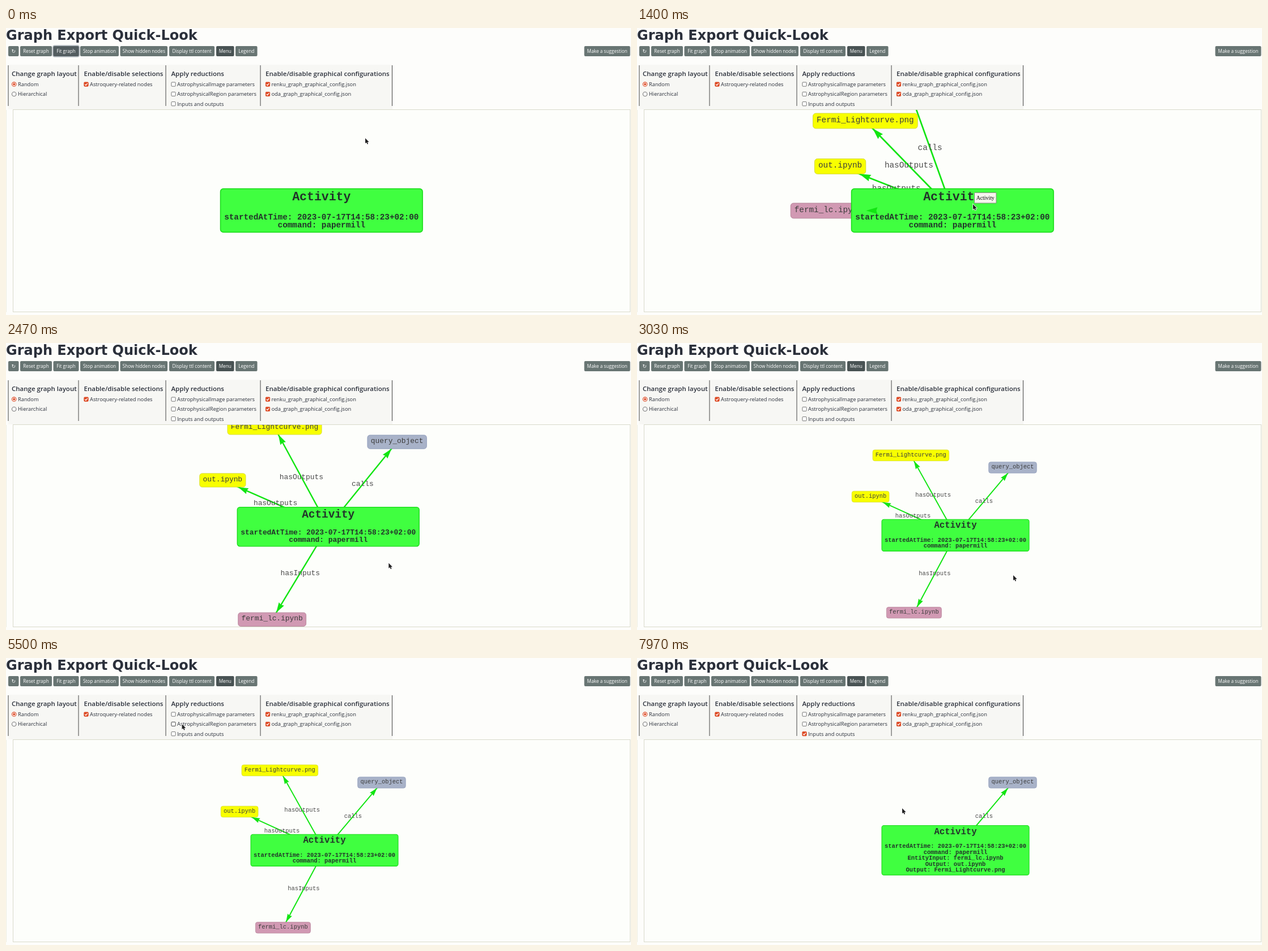
An HTML page with a canvas for the animation above (8 s loop, 1103 by 508 pixels).

```html
<!DOCTYPE html>
<html lang="en">
<head>
<meta charset="utf-8">
<title>Graph Export Quick-Look</title>
<style>
html, body { margin: 0; width: 100%; height: 100%; overflow: hidden; background: #fdfdfb; }
canvas { display: block; width: 1103px; height: 508px; }
</style>
</head>
<body>
<canvas id="stage"></canvas>
<script>
const W = 1103, H = 508, LOOP = 8000;
const canvas = document.getElementById('stage');
const ctx = canvas.getContext('2d');
const dpr = window.devicePixelRatio || 1;
canvas.width = W * dpr;
canvas.height = H * dpr;

const UI = '"Open Sans", "Noto Sans", sans-serif';
const MONO = '"Liberation Mono", monospace';
const INK = '#2b303b', GREEN = '#12e512', ORANGE = '#dd4a25';
const FONT = 14.3, LINE = 14.4, CHAR = FONT * 0.6;
const CHECKED_AT = 6000, REDUCED_AT = 6190;

// Cursor: time, x, y
const cursorKeys = [
  [30, 634, 195], [400, 597, 305], [570, 597, 305], [700, 593, 312],
  [1480, 593, 312], [2000, 677, 346], [2300, 677, 346], [2530, 675, 398],
  [3030, 664, 411], [3370, 535, 359], [3500, 535, 359], [3770, 297, 132],
  [4270, 297, 132], [4600, 297, 86], [4750, 297, 86], [5100, 302, 102],
  [5900, 319, 132], [7000, 319, 132], [7940, 468, 266]
];

// Wheel zoom steps: start, scale, centre of the main node
const views = [
  [0, 1, 556.8, 323], [2040, 0.9, 568.7, 325.2],
  [2600, 0.81, 565.1, 333.2], [2720, 0.729, 562, 340.3]
];

// Satellites swing around the main node: time, angle, radius
const satellites = [
  { label: 'fermi_lc.ipynb', edge: 'hasInputs', fill: '#d199b3', line: '#b58398',
    keys: [[930, 196, 90], [1400, 180, 219], [1700, 146, 218], [2070, 126.9, 213], [2680, 118.1, 213]] },
  { label: 'out.ipynb', edge: 'hasOutputs', fill: '#f8ff00', line: '#d5da30',
    keys: [[930, 205, 100], [1400, 201.5, 213], [1700, 201.5, 224], [2070, 202.5, 227], [2680, 204.5, 226]] },
  { label: 'Fermi_Lightcurve.png', edge: 'hasOutputs', fill: '#f8ff00', line: '#d5da30',
    keys: [[930, 216, 95], [1400, 225.8, 221], [1700, 237, 221], [2070, 243, 220], [2680, 240.9, 222]] },
  { label: 'query_object', edge: 'calls', fill: '#a8b2c8', line: '#8c99b9', stays: true,
    keys: [[930, 230, 100], [1400, 250.2, 236], [1700, 286, 222], [2070, 306.8, 213.6], [2680, 310.1, 215]] }
];

const buttons = [
  ['↻', 4, 22.5], ['Reset graph', 25, 81], ['Fit graph', 83.5, 128.5], ['Stop animation', 131, 199],
  ['Show hidden nodes', 201.5, 285], ['Display ttl content', 288, 368], ['Menu', 371, 402.5],
  ['Legend', 405, 443.5], ['Make a suggestion', 1020.5, 1101.5]
];

const smooth = u => u * u * (3 - 2 * u);

function track(keys, t, ease = u => u) {
  if (t <= keys[0][0]) return keys[0].slice(1);
  const i = keys.findIndex(k => k[0] > t);
  if (i < 0) return keys[keys.length - 1].slice(1);
  const a = keys[i - 1], b = keys[i];
  const u = ease((t - a[0]) / (b[0] - a[0]));
  return a.slice(1).map((v, j) => v + (b[j + 1] - v) * u);
}

function text(str, x, y, font, color = INK, align = 'left') {
  ctx.font = font;
  ctx.fillStyle = color;
  ctx.textAlign = align;
  ctx.fillText(str, x, y);
}

function box(x, y, w, h, r, fill, stroke, width = 1) {
  ctx.beginPath();
  ctx.roundRect(x, y, w, h, r);
  if (fill) { ctx.fillStyle = fill; ctx.fill(); }
  if (stroke) { ctx.strokeStyle = stroke; ctx.lineWidth = width; ctx.stroke(); }
}

function path(points, close) {
  ctx.beginPath();
  points.forEach(([x, y]) => ctx.lineTo(x, y));
  if (close) ctx.closePath();
}

function line(x1, y1, x2, y2, color, width = 1) {
  path([[x1, y1], [x2, y2]]);
  ctx.strokeStyle = color;
  ctx.lineWidth = width;
  ctx.stroke();
}

function drawButtons(t) {
  for (const [label, x1, x2] of buttons) {
    const focused = label === 'Fit graph' && t < 600;
    const fill = label === 'Menu' ? '#495354' : focused ? '#535d60' : '#687573';
    if (focused) box(x1 - 0.5, 31.5, x2 - x1 + 1, 19, 3, null, '#b4bbc0', 2.5);
    box(x1, 32, x2 - x1, 18, 2, fill);
    const font = label === '↻' ? '9px "DejaVu Sans", sans-serif' : '8.2px ' + UI;
    text(label, (x1 + x2) / 2, 44, font, '#fff', 'center');
  }
}

function radio(x, y, label, on) {
  ctx.beginPath();
  ctx.arc(x, y, 3.7, 0, 7);
  ctx.fillStyle = '#fff';
  ctx.fill();
  ctx.strokeStyle = on ? ORANGE : '#777';
  ctx.lineWidth = 1.1;
  ctx.stroke();
  if (on) {
    ctx.beginPath();
    ctx.arc(x, y, 2, 0, 7);
    ctx.fillStyle = ORANGE;
    ctx.fill();
  }
  text(label, x + 6.8, y + 3.3, '9.3px ' + UI);
}

function checkbox(x, y, label, on, hover) {
  const edge = on ? (hover ? '#b43412' : ORANGE) : (hover ? '#444' : '#777');
  box(x - 3.6, y - 3.6, 7.2, 7.2, 1, on ? edge : '#fff', edge);
  if (on) {
    path([[x - 2.2, y], [x - 0.6, y + 1.8], [x + 2.4, y - 1.8]]);
    ctx.strokeStyle = '#fff';
    ctx.lineWidth = 1.3;
    ctx.stroke();
  }
  text(label, x + 6.5, y + 3.3, '9.3px ' + UI);
}

function drawMenu(t, [cx, cy]) {
  ctx.fillStyle = '#f7f7f4';
  ctx.fillRect(4, 65, 678, 79);
  for (const x of [4, 128, 282, 449, 681.5]) line(x, 66, x, 138, '#444');
  const heads = [['Change graph layout', 10], ['Enable/disable selections', 137.5],
    ['Apply reductions', 291.5], ['Enable/disable graphical configurations', 458]];
  for (const [label, x] of heads) text(label, x, 84.7, '600 11.5px ' + UI);
  radio(14.2, 99.6, 'Random', true);
  radio(14.2, 117, 'Hierarchical', false);
  checkbox(141.5, 99.6, 'Astroquery-related nodes', true);
  const rows = ['AstrophysicalImage parameters', 'AstrophysicalRegion parameters', 'Inputs and outputs'];
  rows.forEach((label, i) => {
    const y = 99.6 + i * 17.3;
    const hover = cx > 290 && cx < 384 && Math.abs(cy - y) < 6;
    checkbox(295.5, y, label, i === 2 && t >= CHECKED_AT, hover);
  });
  checkbox(462, 99.6, 'renku_graph_graphical_config.json', true);
  checkbox(462, 117, 'oda_graph_graphical_config.json', true);
}

function satelliteAt(node, t) {
  const [angle, r] = track(node.keys, t);
  const a = angle * Math.PI / 180;
  return { node, x: r * Math.cos(a), y: r * Math.sin(a), hw: node.label.length * CHAR / 2 + 6.5, hh: 13.4 };
}

function drawEdge({ node, x, y }) {
  line(0, 0, x, y, GREEN, 2.7);
  text(node.edge, x / 2, y / 2 + 3.6, FONT + 'px ' + MONO, '#4a4a4a', 'center');
}

function drawArrow({ x, y, hw, hh }) {
  const k = Math.min(hw / Math.abs(x), hh / Math.abs(y));
  ctx.save();
  ctx.translate(x - x * k, y - y * k);
  ctx.rotate(Math.atan2(y, x));
  path([[0, 0], [-20, 6], [-18, 0], [-20, -6]], true);
  ctx.fillStyle = GREEN;
  ctx.fill();
  ctx.restore();
}

function drawSatellite({ node, x, y, hw, hh }) {
  box(x - hw, y - hh, hw * 2, hh * 2, 5, node.fill, node.line);
  text(node.label, x, y + 2.4, FONT + 'px ' + MONO, '#3d3d3d', 'center');
}

function drawActivity(reduced) {
  const lines = ['startedAtTime: 2023-07-17T14:58:23+02:00', 'command: papermill'];
  if (reduced) lines.push('EntityInput: fermi_lc.ipynb', 'Output: out.ipynb', 'Output: Fermi_Lightcurve.png');
  const hw = 178.3, hh = (48.2 + lines.length * LINE) / 2;
  box(-hw, -hh, hw * 2, hh * 2, 5, '#40ff40', '#16d916', 1.5);
  text('Activity', 0, -hh + 20.8, 'bold 21.5px ' + MONO, '#22332a', 'center');
  lines.forEach((str, i) => {
    const y = hh - 8.3 - (lines.length - 1 - i) * LINE;
    text(str, 0, y, 'bold ' + FONT + 'px ' + MONO, '#22332a', 'center');
  });
}

function drawGraph(t) {
  ctx.fillStyle = '#fdfefb';
  ctx.fillRect(12, 144, 1090, 359);
  ctx.save();
  ctx.beginPath();
  ctx.rect(13, 145, 1088, 357);
  ctx.clip();
  const [, scale, x, y] = views.filter(v => v[0] <= t).pop();
  ctx.translate(x, y);
  ctx.scale(scale, scale);
  const reduced = t >= REDUCED_AT;
  const shown = t < 930 ? [] : satellites.filter(n => n.stays || !reduced).map(n => satelliteAt(n, t));
  shown.forEach(drawEdge);
  shown.forEach(drawSatellite);
  drawActivity(reduced);
  shown.forEach(drawArrow);
  ctx.restore();
  ctx.strokeStyle = '#d9dacb';
  ctx.lineWidth = 1;
  ctx.strokeRect(12.5, 144.5, 1089, 358);
}

function drawTooltip(x, y) {
  box(x + 2.5, y - 20.5, 38.5, 18.5, 1, '#f6f5ee', '#85857e');
  text('Activity', x + 21.7, y - 8, '9.8px "Liberation Serif", serif', '#000', 'center');
}

function drawCursor(x, y) {
  ctx.save();
  ctx.translate(x, y);
  if (y > 74 && y < 89) {
    for (const [color, w] of [['#fff', 2.4], ['#222', 1]]) {
      line(0, -4.5, 0, 4.5, color, w);
      line(-2.2, -4.8, 2.2, -4.8, color, w);
      line(-2.2, 4.8, 2.2, 4.8, color, w);
    }
  } else {
    path([[0, 0], [0, 9.3], [2.1, 7.5], [3.6, 10.8], [5.2, 10], [3.8, 6.9], [6.6, 6.7]], true);
    ctx.strokeStyle = '#fff';
    ctx.lineWidth = 1.4;
    ctx.stroke();
    ctx.fillStyle = '#222';
    ctx.fill();
  }
  ctx.restore();
}

function draw(t) {
  ctx.setTransform(dpr, 0, 0, dpr, 0, 0);
  ctx.fillStyle = '#fdfdfb';
  ctx.fillRect(0, 0, W, H);
  line(0.5, 145, 0.5, 503, '#efefe2');
  text('Graph Export Quick-Look', 0, 20.6, 'bold 24px "DejaVu Sans", sans-serif');
  const cursor = track(cursorKeys, t, smooth);
  drawButtons(t);
  drawMenu(t, cursor);
  drawGraph(t);
  if (t > 1000 && t < 2380) drawTooltip(...cursor);
  drawCursor(...cursor);
}

const start = performance.now();
function tick() {
  draw((performance.now() - start) % LOOP);
  requestAnimationFrame(tick);
}
tick();
</script>
</body>
</html>
```
